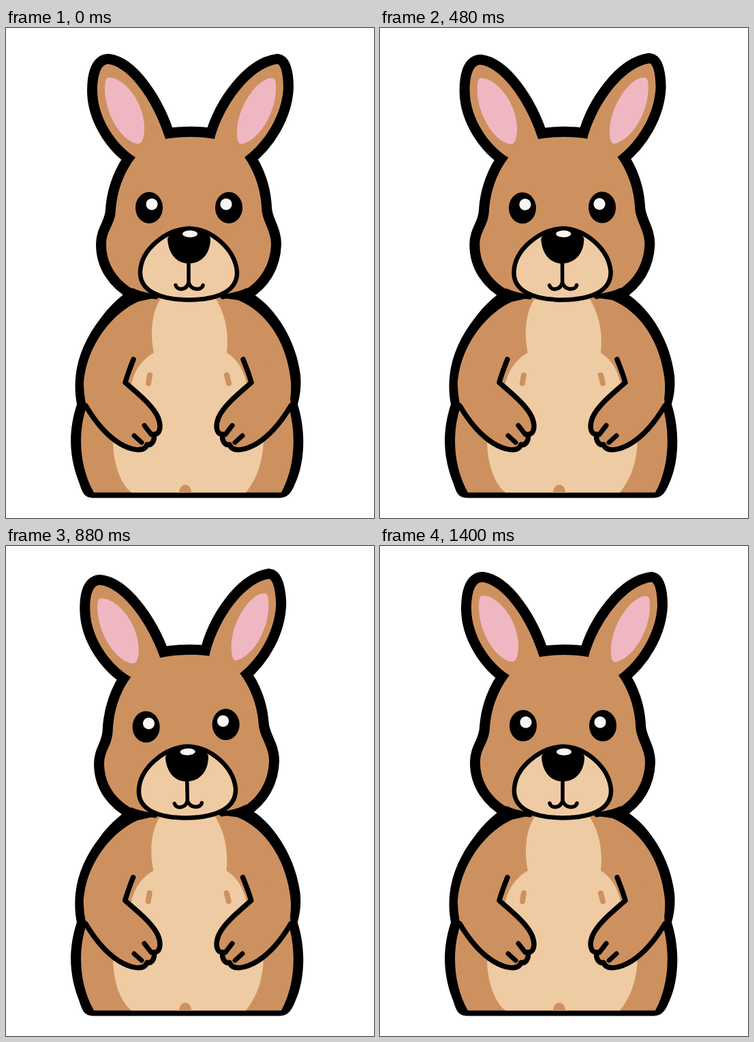
Recreate the animation shown at these times as an HTML page. Size 540 by 720 pixels, loop 1.44 s.

```html
<!DOCTYPE html>
<html lang="en">
<head>
<meta charset="utf-8">
<title>Swaying kangaroo</title>
<style>
  html, body { margin: 0; width: 100%; height: 100%; overflow: hidden; background: #fff; }
  svg { display: block; width: 540px; height: 720px; }
  path { stroke-linecap: round; stroke-linejoin: round; }
</style>
</head>
<body>
<svg id="stage" viewBox="0 0 540 720"></svg>
<script>
const LOOP = 1440, STEP = 40;
const INK = '#000', FUR = '#cd915f', CREAM = '#efcba4', PINK = '#efb7c2', SHINE = '#f8f5f3';
const stage = document.getElementById('stage');
const parts = [];

function add(d, fill, width = 0, stroke = INK) {
  const el = document.createElementNS('http://www.w3.org/2000/svg', 'path');
  el.setAttribute('fill', fill);
  if (width) {
    el.setAttribute('stroke', stroke);
    el.setAttribute('stroke-width', width);
  }
  stage.append(el);
  parts.push({ el, d });
}
const line = (d, width, stroke) => add(d, 'none', width, stroke);

const mapPoints = (d, fn) =>
  d.replace(/(-?[\d.]+),(-?[\d.]+)/g, (_, x, y) => fn(+x, +y).join());

const mirror = d => mapPoints(d, (x, y) => [535 - x, y]);

function ellipse(x, y, rx, ry, fill) {
  const a = rx * 0.5523, b = ry * 0.5523;
  add(`M${x - rx},${y} C${x - rx},${y - b} ${x - a},${y - ry} ${x},${y - ry}` +
    ` C${x + a},${y - ry} ${x + rx},${y - b} ${x + rx},${y}` +
    ` C${x + rx},${y + b} ${x + a},${y + ry} ${x},${y + ry}` +
    ` C${x - a},${y + ry} ${x - rx},${y + b} ${x - rx},${y}Z`, fill);
}

const head = 'M190,386 C163,371 147,347 147,318 C147,297 160,290 161,267 C163,238 174,210 190,190' +
  ' C160,171 134,131 134,92 C134,70 139,53 150,53 C181,57 217,108 234,163' +
  ' C258,159 284,159 306,163 C320,111 361,58 398,53 C404,54 407,70 407,88' +
  ' C405,127 381,167 350,190 C365,211 374,238 375,264 C376,285 389,297 389,318' +
  ' C388,348 373,372 349,386 C325,400 216,400 190,386Z';

// Silhouettes
add(head, INK, 30);
add('M128,690.5 C112,690 112,680 105,662 C92,625 92,590 104,553 C96,510 107,467 140,425' +
  ' C155,405 165,398 174,390 L363,391 C397,413 426,460 432,510 C434,530 430,545 428,553' +
  ' C441,595 438,640 424,670 C418,685 412,690 402,690.5Z', INK);

// Body
add('M194,402 C158,418 119,464 114,520 C114,535 116,546 118,557 C106,592 106,642 129,682.5' +
  ' L404,682.5 C426,642 425,592 415,557 C417,546 419,535 418,520 C413,464 384,418 341,400' +
  ' L300,394 L230,394Z', FUR);
add('M227,398 C212,420 212,455 217,477 C199,487 187,505 183,527 L157,605' +
  ' C157,640 168,670 184,682.5 L352,682.5 C370,660 377,635 378,605 L354,527' +
  ' C350,505 341,488 324,477 C328,440 318,415 308,398Z', CREAM);
add('M254,682.5 C255,667 271,667 272,682.5Z', FUR);
line('M211,510 L209,522 M324,510 L327,522', 8, FUR);

// Arms
const arm = 'M187,487 C183,497 178,510 175,521 C192,536 215,554 223,572 C229,587 225,598 217,597' +
  ' C219,607 213,614 207,612 C203,624 184,621 166,610 C147,598 130,577 117,555';
for (const side of [d => d, mirror]) {
  add(side(arm + ' L120,520 L150,487Z'), FUR);
  line(side(arm), 7.5);
  line(side('M203,584 L213,597 M188,599 L199,609'), 7);
}

// Head
add(head, FUR);
line('M186,386 C198,392 208,393 220,395 M353,386 C341,392 330,393 318,395', 7);
add('M149,73 C170,70 204,107 203,150 C202,165 199,171 192,170 C168,165 145,125 145,90' +
  ' C145,80 146,75 149,73Z', PINK);
add('M392,74 C372,70 338,115 339,155 C339,168 342,172 348,170 C375,162 396,120 396,90' +
  ' C396,80 396,76 392,74Z', PINK);
for (const [x, gx] of [[210, 214], [327, 323]]) {
  ellipse(x, 264, 20, 23, INK);
  ellipse(gx, 259, 8.5, 8.5, SHINE);
}

// Muzzle
add('M268,294.5 C235,296 198,325 197,358 C196,386 225,399 268,399.5' +
  ' C312,399 340,386 339,358 C336,325 302,295 268,294.5Z', CREAM, 6.5);
add('M237,310 C240,300 255,293 269,293 C284,293 298,300 300,310 C300,330 288,346 268,346' +
  ' C249,346 238,330 237,310Z', INK);
ellipse(270, 302.5, 11, 5, SHINE);
line('M268,345 L268,374 M249,378 C251,386 265,386 268,374 C271,386 287,386 289,378', 5.5);

// Sway over time: [ms, lean], leaning left is positive
const keys = [[0, 0], [200, -0.165], [300, -0.14], [480, 0.06], [560, 0.41], [600, 0.75],
  [640, 1], [680, 1.02], [880, 0.27], [1100, -0.17], [1400, 0], [LOOP, 0]];

function slope(i) {
  if (i === 0 || i >= keys.length - 2) return 0;
  const [a, b] = [keys[i - 1], keys[i + 1]];
  return (b[1] - a[1]) / (b[0] - a[0]);
}

function lean(t) {
  let i = 0;
  while (keys[i + 1][0] <= t) i++;
  const [t0, v0] = keys[i], [t1, v1] = keys[i + 1];
  const w = t1 - t0, u = (t - t0) / w, r = 1 - u;
  return r * r * ((1 + 2 * u) * v0 + u * w * slope(i)) +
    u * u * ((3 - 2 * u) * v1 - r * w * slope(i + 1));
}

const clamp = v => Math.min(1, Math.max(0, v));
const smooth = v => (v = clamp(v), v * v * (3 - 2 * v));

// The body bends softly below the neck, the head swings and tilts above it
function bend(x, y, s) {
  const h = 420 - y;
  const shift = h > 0 ? 3.6 + 0.056 * h + 0.00016 * h * h : 3.6 * clamp((600 - y) / 180) ** 1.5;
  const tilt = 0.11 * smooth((465 - y) / 110) + 0.022 * clamp((300 - y) / 230);
  return [(x - s * shift).toFixed(2), (y - s * tilt * (x - 268)).toFixed(2)];
}

function draw(now) {
  const s = lean(Math.floor((now % LOOP) / STEP) * STEP);
  for (const { el, d } of parts) el.setAttribute('d', mapPoints(d, (x, y) => bend(x, y, s)));
  requestAnimationFrame(tick);
}

const start = performance.now();
const tick = () => draw(performance.now() - start);
tick();
</script>
</body>
</html>
```
